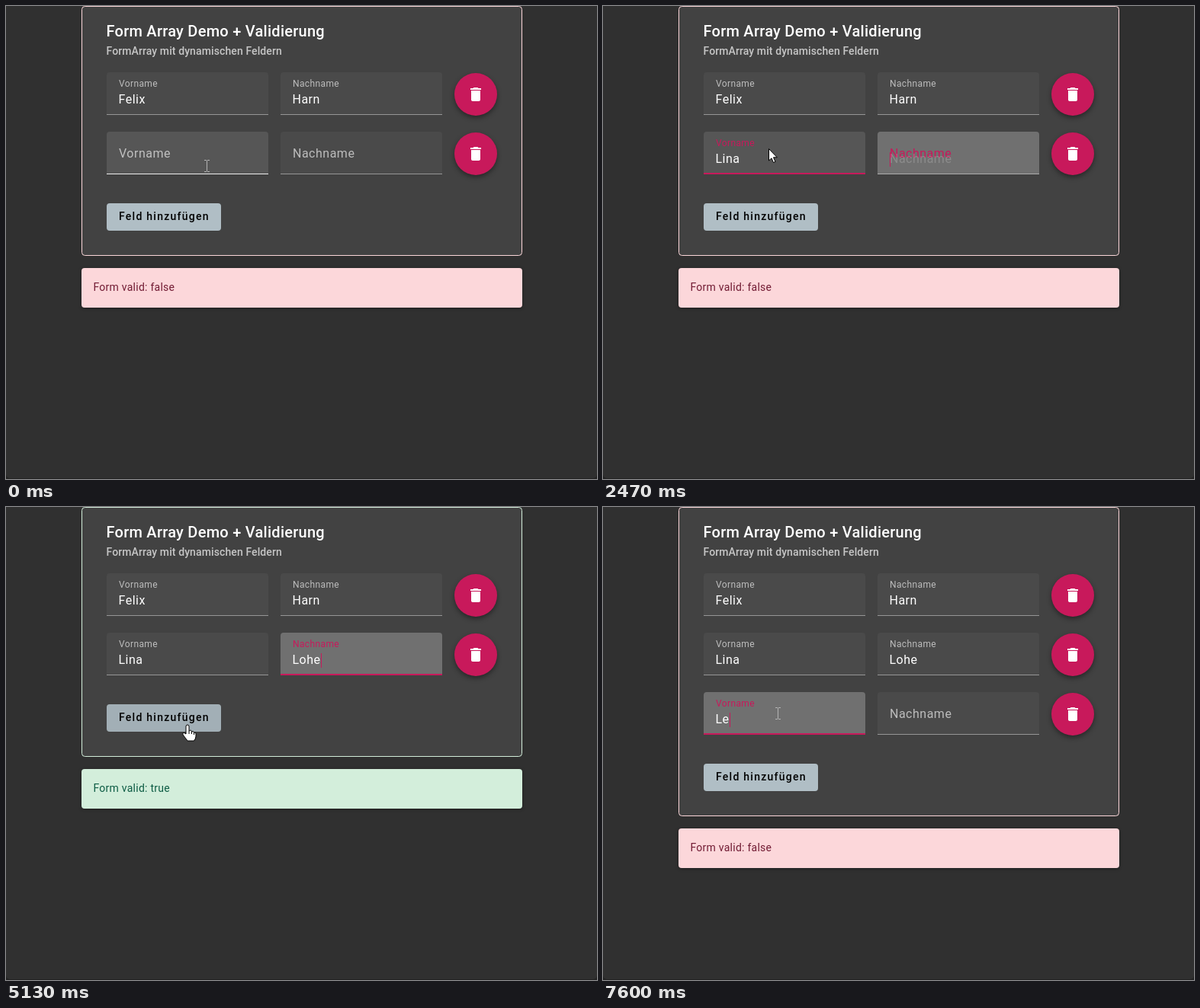
An HTML page that plays this animation: 775x621 px, repeating every 8000 ms.

```html
<!DOCTYPE html>
<html lang="de">
<head>
<meta charset="utf-8">
<title>Form Array Demo</title>
<style>
  html, body { margin: 0; width: 100%; height: 100%; overflow: hidden; background: #222; }
  svg { display: block; }
  text { font: 16px Roboto, sans-serif; letter-spacing: .5px; fill: #fff; white-space: pre; }
  .title { font-size: 20px; font-weight: 500; letter-spacing: .25px; }
  .sub { font-size: 14px; font-weight: 500; letter-spacing: .1px; fill: #c6c6c6; }
  .btn { font-size: 14px; font-weight: 500; letter-spacing: 1.25px; fill: #000; }
  .result { font-size: 14px; letter-spacing: .25px; }
  .lift { filter: drop-shadow(0 3px 3px rgba(0, 0, 0, .4)); }
  .low { filter: drop-shadow(0 1px 2px rgba(0, 0, 0, .4)); }
</style>
</head>
<body>
<svg id="stage" width="775" height="621" viewBox="0 0 775 621"></svg>
<script>
const LOOP = 8000, ADD_ROW = 5330, BLINK = 530, PINK = '#c8195b';
const stage = document.getElementById('stage');
const pen = document.createElement('canvas').getContext('2d');
pen.font = '16px Roboto, sans-serif';

// keys: moments at which each letter appears; focus: [start, end]
const rows = [
  [{ text: 'Felix' }, { text: 'Harn' }],
  [{ text: 'Lina', keys: [1600, 1800, 2000, 2200], focus: [650, 2470] },
   { text: 'Lohe', keys: [3130, 3670, 3870, 4000], focus: [2470, 5200] }],
  [{ text: 'Le', keys: [7330, 7600], focus: [6070, 9e9] },
   { text: '', keys: [] }]
];

// Pointer stops: [time, x, y]
const path = [
  [0, 262.5, 210], [70, 262.5, 210], [330, 217, 187], [4800, 217, 187],
  [5130, 238, 286], [5600, 238.5, 286], [5730, 228.5, 271], [LOOP, 228.5, 271]
];

const clamp = v => Math.min(1, Math.max(0, v));
const ease = v => { v = clamp(v); return v * v * (3 - 2 * v); };
const mix = (a, b, p) => a + (b - a) * p;
const rect = (x, y, w, h, fill, more = '') =>
  `<rect x="${x}" y="${y}" width="${w}" height="${h}" fill="${fill}" ${more}/>`;
const text = (x, y, s, more = '') => `<text x="${x}" y="${y}" ${more}>${s}</text>`;

function pointer(t) {
  const i = path.findIndex(stop => stop[0] > t);
  const [a, b] = [path[i - 1], path[i]];
  const p = ease((t - a[0]) / (b[0] - a[0]));
  return { x: mix(a[1], b[1], p), y: mix(a[2], b[2], p) };
}

const inside = (m, x, y, w, h) => m.x >= x && m.x < x + w && m.y >= y && m.y < y + h;

function field(x, y, name, { text: full, keys, focus = [9e9, 9e9] }, t, mouse) {
  const typed = keys ? full.slice(0, keys.filter(k => k <= t).length) : full;
  const [start, end] = focus;
  const focused = t >= start && t < end;
  const hover = inside(mouse, x, y, 212, 56);
  const float = typed ? 1 : ease((t - start) / 150);
  const fade = focused ? 1 : t >= end ? 1 - clamp((t - end) / 150) : 0;
  const fill = focused ? '#707070' : hover ? '#565656' : '#4a4a4a';
  const tint = focused && float > .1 || fade > .7 ? PINK : '#fff';
  const scale = mix(1, .75, float);

  let out = `<path d="M${x} ${y + 56}v-52q0-4 4-4h204q4 0 4 4v52z" fill="${fill}"/>`;
  out += rect(x, y + 55, 212, 1, '#fff', `opacity="${hover && !focused ? .9 : .42}"`);
  if (fade) {
    const w = 212 * (focused ? ease((t - start) / 150) : 1);
    out += rect(x + 106 - w / 2, y + 54, w, 2, PINK, `opacity="${fade}"`);
  }
  out += text(0, 0, name, `style="fill:${tint}" opacity="${tint === PINK ? 1 : .63}"
    transform="translate(${x + 16} ${mix(y + 34, y + 19, float)}) scale(${scale})"`);
  if (typed) out += text(x + 15.5, y + 41, typed);
  else if (focused)
    out += text(x + 16, y + 41, name, `opacity="${.6 * clamp((t - start + 20) / 67)}"`);
  if (focused) {
    const last = Math.max(start, ...keys.filter(k => k <= t));
    const cx = Math.round(x + 16 + pen.measureText(typed).width + typed.length * .5);
    if (Math.floor((t - last) / BLINK) % 2 === 0) out += rect(cx, y + 27, 1, 19, PINK);
  }
  return out;
}

const trash = y => `<circle cx="616" cy="${y + 29}" r="28" fill="${PINK}" class="lift"/>
  <path transform="translate(604 ${y + 17})" fill="#fff"
    d="M6 19c0 1.1.9 2 2 2h8c1.1 0 2-.9 2-2V7H6zM19 4h-3.5l-1-1h-5l-1 1H5v2h14z"/>`;

function addButton(y, t, mouse) {
  let shade = inside(mouse, 132, y, 150, 36) ? .08 : 0;
  if (t >= 5200 && t < 5600) shade = t < 5420 ? .1 : .1 * (5600 - t) / 180;
  return rect(132, y, 150, 36, '#b0bec5', 'rx="4"')
    + rect(132, y, 150, 36, '#000', `rx="4" opacity="${shade}"`)
    + text(148, y + 22, 'Feld hinzufügen', 'class="btn"');
}

function cursor({ x, y }, count, buttonY) {
  const at = `transform="translate(${Math.round(x)} ${Math.round(y)})"`;
  const line = 'fill="#fff" stroke="#000" stroke-linejoin="round"';
  if (inside({ x, y }, 132, buttonY, 150, 36))
    return `<path ${at} ${line} d="M-2 12V2Q-2 0 0 0T2 2V8Q5 6 5.5 9 8 7.500 8.500 10
      11 9 11 12V15Q11 18 8.500 21H0Q-2 18-6 13-7 10-4.500 10.500Z
      M2 8v4M5.500 9v3M8.500 10v3"/>`;
  const inRow = y - 87 - 78 * Math.floor((y - 87) / 78);
  if (y < 87 + 78 * count && inRow >= 24 && inRow < 50)
    return `<path ${at} fill="none" stroke="#b4b4b4"
      d="M-3-7.500h3M1-7.500h3M.5-7v14M-3 7.500h3M1 7.500h3"/>`;
  return `<path ${at} ${line} d="M.5.5V16L4 12.800 6.500 18.500 9 17.500 6.500 11.800H11.300Z"/>`;
}

function scene(t) {
  const count = t < ADD_ROW ? 2 : 3, shift = (count - 2) * 78;
  const valid = t >= 3130 && t < ADD_ROW;
  const tone = valid ? '#d3eedb' : '#fcd7da';
  const mouse = pointer(t);

  let out = rect(0, -10, 775, 630, '#303030', 'rx="5"');
  out += rect(99.5, .5, 577, 327 + shift, '#424242', `rx="4" stroke="${tone}"`);
  out += text(131.5, 40, 'Form Array Demo + Validierung', 'class="title"');
  out += text(131.5, 64, 'FormArray mit dynamischen Feldern', 'class="sub"');
  rows.slice(0, count).forEach(([first, last], i) => {
    const y = 87 + 78 * i;
    out += field(132, y, 'Vorname', first, t, mouse)
      + field(360, y, 'Nachname', last, t, mouse) + trash(y);
  });
  out += addButton(259 + shift, t, mouse);
  out += rect(99, 344 + shift, 578, 52, tone, 'rx="4" class="low"');
  out += text(114.5, 374 + shift, `Form valid: ${valid}`,
    `class="result" style="fill:${valid ? '#0d5c44' : '#721c34'}"`);
  return out + cursor(mouse, count, 259 + shift);
}

const began = performance.now();
let shown = '';
function draw() {
  const next = scene((performance.now() - began) % LOOP);
  if (next !== shown) stage.innerHTML = shown = next;
  requestAnimationFrame(draw);
}
draw();
</script>
</body>
</html>
```
